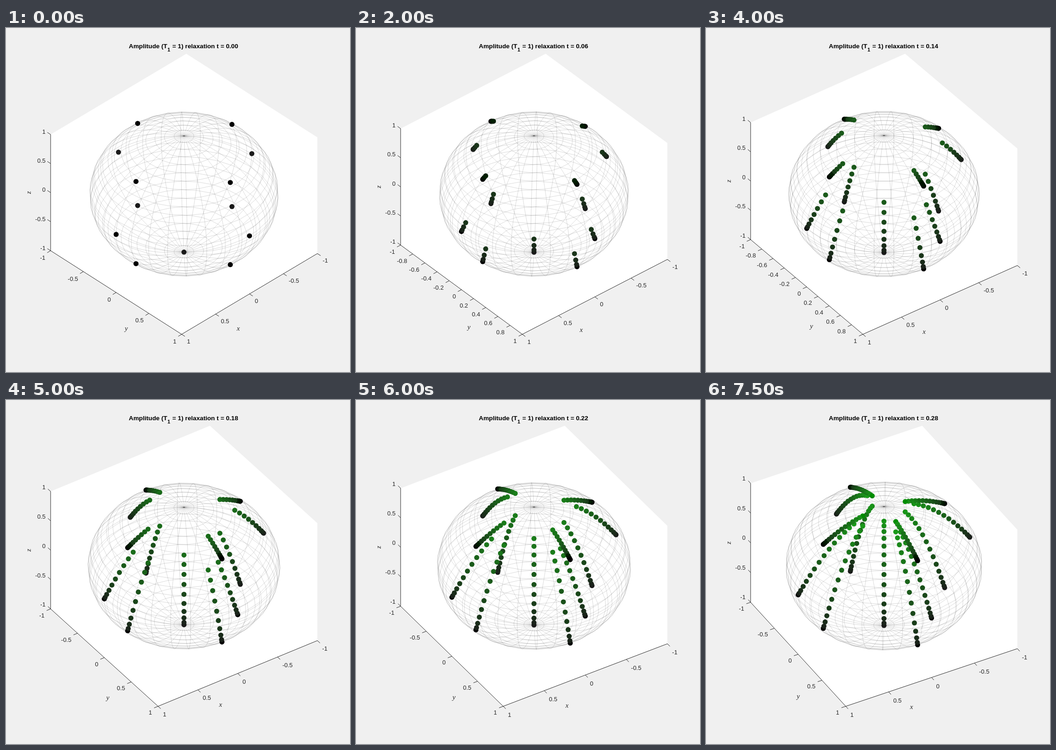
Animation of 748 by 748 pixels, one loop 8 s. Source, as an HTML page with a canvas:

```html
<!DOCTYPE html>
<html lang="en">
<head>
<meta charset="utf-8">
<title>Amplitude relaxation</title>
<style>
html, body { margin: 0; width: 100%; height: 100%; overflow: hidden; background: #f0f0f0; }
canvas { display: block; }
</style>
</head>
<body>
<canvas id="stage" width="748" height="748"></canvas>
<script>
const ctx = document.getElementById('stage').getContext('2d');
const SANS = '"Liberation Sans", Arial, sans-serif';
const SERIF = '"Liberation Serif", "Noto Serif", serif';
const STEP = 500, STEPS = 16, DT = 0.02, RAD = Math.PI / 180;
const CX = 387, CY = 361, HALF_W = 290, HALF_H = 305, INK = '#262626';

// Start points: three rings of four, plus the south pole
const starts = [[0, 0, -1]];
for (const polar of [45, 90, 135])
  for (const [x, y] of [[1, 0], [0, 1], [-1, 0], [0, -1]]) {
    const r = Math.sin(polar * RAD);
    starts.push([x * r, y * r, Math.cos(polar * RAD)]);
  }

// Orthographic view at 45 degrees elevation, stretched to fill the axes box
function makeView(azimuth) {
  const c = Math.cos(azimuth * RAD), s = Math.sin(azimuth * RAD);
  const span = Math.abs(c) + Math.abs(s);
  const sx = HALF_W / span, sy = HALF_H / (span + 1);
  return (x, y, z) => {
    const w = x * s - y * c;
    return { x: CX + sx * (x * c + y * s), y: CY + sy * (w - z), depth: (w + z) * Math.SQRT1_2 };
  };
}

function line(a, b) {
  ctx.beginPath();
  ctx.moveTo(a.x, a.y);
  ctx.lineTo(b.x, b.y);
  ctx.stroke();
}

function text(str, x, y, font, align = 'center', baseline = 'middle') {
  ctx.font = font;
  ctx.textAlign = align;
  ctx.textBaseline = baseline;
  ctx.fillText(str, x, y);
}

function drawBox(view) {
  const corners = [[1, -1, 1], [-1, -1, 1], [-1, 1, 1], [-1, 1, -1], [1, 1, -1], [1, -1, -1]];
  ctx.fillStyle = '#fff';
  ctx.beginPath();
  for (const p of corners) {
    const q = view(...p);
    ctx.lineTo(q.x, q.y);
  }
  ctx.fill();
}

function sphereEdges(view) {
  const at = (lon, lat) => view(
    Math.cos(lat * RAD) * Math.cos(lon * RAD),
    Math.cos(lat * RAD) * Math.sin(lon * RAD),
    Math.sin(lat * RAD));
  const edges = [];
  for (let lon = 0; lon < 360; lon += 12)
    for (let lat = -90; lat < 90; lat += 6) {
      const p = at(lon, lat);
      edges.push([p, at(lon, lat + 6)]);
      if (lat > -90) edges.push([p, at(lon + 12, lat)]);
    }
  return edges;
}

function drawEdges(edges, front) {
  ctx.strokeStyle = 'rgba(0,0,0,0.15)';
  ctx.lineWidth = 1;
  for (const [a, b] of edges)
    if ((a.depth + b.depth >= 0) === front) line(a, b);
}

function drawDots(view, last) {
  const dots = [];
  for (let n = 0; n <= last; n++) {
    // Decay accumulates: each step damps by its own elapsed time
    const decay = Math.exp(-DT * n * (n + 1) / 2), shrink = Math.sqrt(decay);
    for (const [x0, y0, z0] of starts) {
      const x = x0 * shrink, y = y0 * shrink, z = 1 - (1 - z0) * decay;
      const p = view(x, y, z);
      const veiled = Math.hypot(x, y, z) < 0.995 || p.depth < -0.3;
      const tint = v => Math.round(veiled ? v + (255 - v) * 0.1 : v);
      dots.push({ ...p, color: `rgb(${tint(0)},${tint(n * DT * 510)},${tint(0)})` });
    }
  }
  dots.sort((a, b) => a.depth - b.depth);
  for (const d of dots) {
    ctx.fillStyle = d.color;
    ctx.beginPath();
    ctx.arc(d.x, d.y, 5.5, 0, 2 * Math.PI);
    ctx.fill();
  }
}

function drawAxis(place, tickEnd, step, dx, dy, align) {
  line(place(-1), place(1));
  const count = Math.round(2 / step);
  for (let i = 0; i <= count; i++) {
    const v = Math.round((i * step - 1) * 10) / 10, p = place(v);
    line(p, tickEnd(v));
    text(String(v), p.x + dx, p.y + dy, `13px ${SANS}`, align);
  }
}

function drawAxes(view, k) {
  const out = 1.05;
  ctx.strokeStyle = ctx.fillStyle = INK;
  ctx.lineWidth = 1;
  const onX = v => view(v, 1, -1), onY = v => view(1, v, -1), onZ = v => view(1, -1, v);
  const yStep = k >= 2 && k <= 9 ? 0.2 : 0.5;
  drawAxis(onX, v => view(v, out, -1), 0.5, 11.5 - 0.1 * k, 16 + 0.25 * k, 'left');
  drawAxis(onY, v => view(out, v, -1), yStep, -11.5 - 0.17 * k, 16.3 - 0.15 * k, 'right');
  drawAxis(onZ, v => view(1, -out, v), 0.5, -11, -5 - k / 3, 'right');

  const font = `italic 15px ${SERIF}`;
  const mx = onX(0), my = onY(0), mz = onZ(0);
  text('x', mx.x - 24.5 - 1.27 * k, mx.y + 75.5 - 0.73 * k, font);
  text('y', my.x + 22 - 1.45 * k, my.y + 79 + 0.87 * k, font);
  ctx.save();
  ctx.translate(50, mz.y);
  ctx.rotate(-Math.PI / 2);
  text('z', 0, 0, font);
  ctx.restore();
}

function drawTitle(t) {
  const font = `bold 13.7px ${SANS}`;
  ctx.fillStyle = '#000';
  text('Amplitude (T', 267, 44, font, 'left', 'alphabetic');
  text('1', 351, 51, `bold 11px ${SANS}`, 'left', 'alphabetic');
  text(` = 1) relaxation t = ${t.toFixed(2)}`, 358, 44, font, 'left', 'alphabetic');
}

function draw(k) {
  const view = makeView(136 + k), last = Math.max(0, k - 1);
  ctx.fillStyle = '#f0f0f0';
  ctx.fillRect(0, 0, 748, 748);
  drawBox(view);
  const edges = sphereEdges(view);
  drawEdges(edges, false);
  drawDots(view, last);
  drawEdges(edges, true);
  drawAxes(view, k);
  drawTitle(last * DT);
}

let shown = -1;
const start = performance.now();
function tick() {
  const k = Math.floor((performance.now() - start) / STEP) % STEPS;
  if (k !== shown) draw(shown = k);
  requestAnimationFrame(tick);
}
tick();
</script>
</body>
</html>
```
